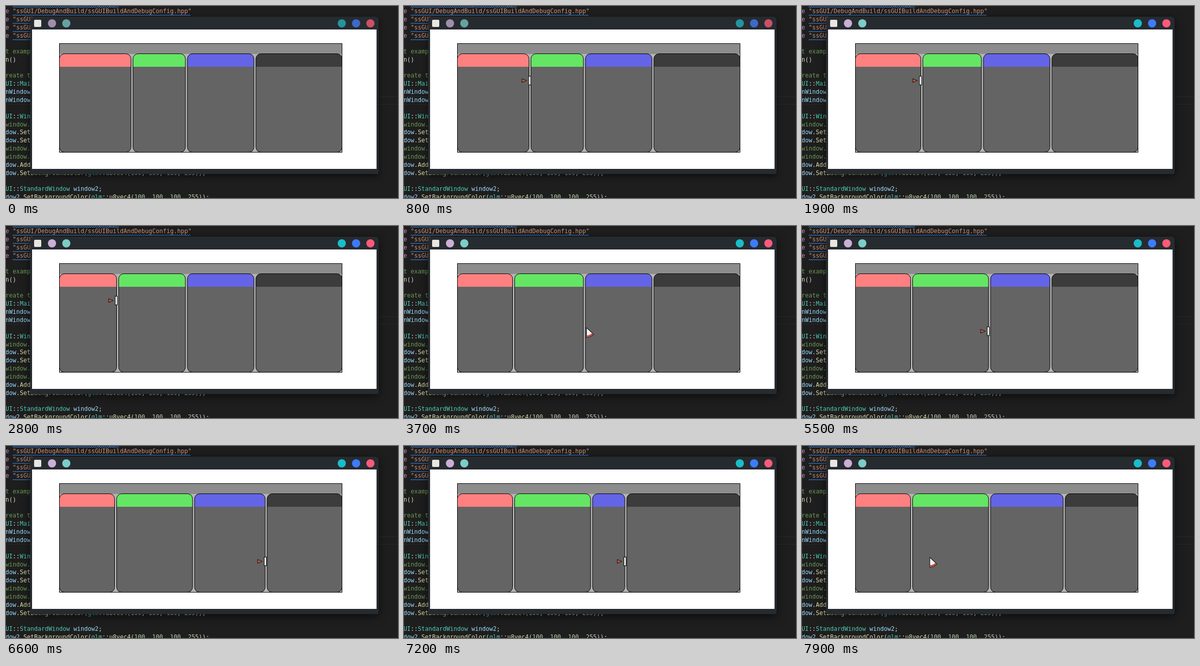
An HTML page with a canvas that plays this animation: 767 by 376 pixels, repeating every 8000 ms.

```html
<!DOCTYPE html>
<html lang="en">
<head>
<meta charset="utf-8">
<title>Resizable docked panels</title>
<style>
html, body { margin: 0; width: 100%; height: 100%; overflow: hidden; background: #1e1e1e; }
canvas { display: block; }
</style>
</head>
<body>
<canvas id="stage" width="767" height="376"></canvas>
<script>
const ctx = document.getElementById('stage').getContext('2d');
const LOOP = 8000, STEP = 100;
const COL = 6.998;

const colors = {
  k: '#c586c0', s: '#ce9178', c: '#6a9955', f: '#dcdcaa',
  t: '#4ec9b0', v: '#9cdcfe', n: '#b5cea8', p: '#d4d4d4'
};

// Each code line: middle y, then "kind:text" runs.
const setColor = ['p:.', 'f:SetBackgroundColor', 'p:(', 't:glm', 'p:::', 'f:u8vec4', 'p:(',
  'n:100', 'p:, ', 'n:100', 'p:, ', 'n:100', 'p:, ', 'n:255', 'p:));'];
const include = path => ['k:e ', 's:"ssGUI/' + path + '"'];
const code = [
  [-6, ...include('HeaderGroups/Group.hpp')],
  [10, ...include('DebugAndBuild/ssGUIBuildAndDebugConfig.hpp')],
  [26, ...include('')], [42, ...include('')], [58, ...include('')],
  [89, 'c:t example'],
  [105, 'f:n', 'p:()'],
  [136, 'c:reate the'],
  [152, 't:UI', 'p:::', 't:Main'],
  [168, 'v:nWindow'], [184, 'v:nWindow'],
  [216, 't:UI', 'p:::', 't:Wind'],
  [232, 'c:window.'],
  [247, 'v:dow', 'p:.', 'f:Set'], [263, 'v:dow', 'p:.', 'f:Set'],
  [279, 'c:window.'], [295, 'c:window.'],
  [311, 'v:dow', 'p:.', 'f:Add'],
  [327, 'v:dow', ...setColor],
  [358, 't:UI', 'p:::', 't:StandardWindow ', 'v:window2', 'p:;'],
  [374, 'v:dow2', ...setColor]
];

// Divider positions, one value per step while being dragged.
const dividers = [
  { from: 1900, rest: 246.5, y: 146, grip: -2.7, path: [234.5, 204, 186, 199, 224, 241, 241, 238, 228, 218.5, 214.5] },
  { from: 4600, rest: 353, y: 198, endY: 206, grip: -.7, path: [365, 387, 404, 386, 352, 326, 335, 352, 363, 367] },
  { from: 6600, rest: 487, y: 226, grip: -1.6, path: [509, 536, 549, 518, 456, 394, 434, 484, 519, 513] }
];

// Free pointer: time, x, y, and 1 for the resize shape.
const pointer = [
  [200, 0, 0], [300, 58, 28], [400, 122, 62], [500, 186, 100], [600, 234, 124], [700, 255, 135], [800, 246, 146, 1],
  [3100, 236, 157], [3200, 286, 178], [3300, 338, 192], [3400, 357, 197], [3700, 356, 198],
  [4200, 352.5, 198, 1], [4400, 350.5, 198, 1],
  [5600, 378, 208], [5700, 424, 214], [5800, 472, 220], [5900, 496, 223],
  [6100, 489, 223], [6200, 483.5, 225, 1],
  [7600, 468, 225], [7700, 372, 222], [7800, 286, 219], [7900, 249, 217]
];

function rect(x, y, w, h, fill) {
  ctx.fillStyle = fill;
  ctx.fillRect(x, y, w, h);
}

function rounded(x, y, w, h, r) {
  ctx.beginPath();
  ctx.roundRect(x, y, w, h, r);
}

function dot(x, fill) {
  ctx.fillStyle = fill;
  ctx.beginPath();
  ctx.arc(x, 34, 8, 0, 7);
  ctx.fill();
}

function squiggle(x, end, y) {
  ctx.strokeStyle = '#3794ff';
  ctx.lineWidth = 1;
  ctx.beginPath();
  for (let up = 0; x < end; x += 2, up ^= 1) ctx.lineTo(x, y + (up ? -1 : 1));
  ctx.stroke();
}

function drawEditor() {
  rect(0, 0, 767, 376, '#1e1e1e');
  rect(0, 177, 767, 1, '#292929');
  rect(0, 192, 767, 1, '#292929');
  ctx.font = '11.63px "DejaVu Sans Mono", monospace';
  for (const [y, ...runs] of code) {
    let x = -1;
    for (const run of runs) {
      const text = run.slice(2), end = x + text.length * COL;
      ctx.fillStyle = colors[run[0]];
      ctx.fillText(text, x, y + 4);
      if (run[0] === 's') squiggle(x, end, y + 8);
      x = end;
    }
  }
}

function drawWindow(focused) {
  ctx.save();
  ctx.shadowColor = 'rgba(0,0,0,.6)';
  ctx.shadowBlur = focused ? 18 : 12;
  ctx.shadowOffsetY = 4;
  ctx.fillStyle = '#262b30';
  rounded(47, 21, 682, 308, [6, 6, 3, 3]);
  ctx.fill();
  ctx.restore();
  rect(51, 46, 674, 273, '#fff');

  ctx.fillStyle = '#e9e6e0';
  rounded(55, 27, 14, 14, 2);
  ctx.fill();
  const tones = focused
    ? ['#cbafd6', '#7ccdc7', '#18bec9', '#3d7bff', '#ff5a7a']
    : ['#a08fab', '#64a39f', '#22959e', '#3f69c9', '#cd5064'];
  [90, 118, 657, 685, 713].forEach((x, i) => dot(x, tones[i]));
}

function drawPanel(left, right, color) {
  ctx.save();
  rounded(left, 93.5, right - left, 193, 10);
  ctx.clip();
  rect(left, 93, right - left, 194, '#646464');
  rect(left, 93, right - left, 26, color);
  ctx.restore();
  ctx.strokeStyle = '#000';
  ctx.lineWidth = 1;
  rounded(left, 93.5, right - left, 193, 10);
  ctx.stroke();
}

function drawPanels(splits) {
  rect(104, 73, 554, 214, '#b4b4b4');
  rect(104, 73, 554, 21, '#8c8c8c');
  ctx.strokeStyle = '#000';
  ctx.lineWidth = 1;
  ctx.strokeRect(104.5, 73.5, 553, 213);
  const edges = [102.5, ...splits, 659.5];
  ['#ff8080', '#64e664', '#6464e6', '#3c3c3c'].forEach((color, i) =>
    drawPanel(edges[i] + 2, edges[i + 1] - 2, color));
}

function shape(d, fill, line) {
  const path = new Path2D(d);
  ctx.fillStyle = fill;
  ctx.fill(path);
  if (!line) return;
  ctx.strokeStyle = line;
  ctx.lineWidth = 1.3;
  ctx.lineJoin = 'round';
  ctx.stroke(path);
}

function drawPointer([, x, y, resize]) {
  ctx.save();
  ctx.translate(x, y);
  if (resize) {
    shape('M-15 -3.7L-6 0L-15 3.7Z', '#d0553c', '#222');
    shape('M-2.2 -8.5H2.2V8.5H-2.2Z', '#f2f2f2', '#222');
  } else {
    shape('M1 1L15 14Q9 20 1 20.5Z', '#f4f2f2', '#222');
    shape('M1.6 16.5Q8 16 12 11.8L14.2 14Q9 19.4 1.6 19.8Z', '#d0483f');
  }
  ctx.restore();
}

function splitAt(d, t) {
  if (t < d.from) return d.rest;
  return d.path[Math.min((t - d.from) / STEP, d.path.length - 1)];
}

function pointerAt(t) {
  const free = pointer.findLast(p => p[0] <= t);
  const held = dividers.findLast(d => d.from <= t);
  if (!held || free[0] > held.from) return free;
  const end = held.from + (held.path.length - 1) * STEP;
  const part = Math.min(1, (t - held.from) / (end - held.from));
  const y = held.y + ((held.endY || held.y) - held.y) * part;
  // The second drag ends with the pointer slightly behind its divider.
  const lag = held.endY && t >= end ? -1.8 : 0;
  return [t, splitAt(held, t) + held.grip + lag, y, 1];
}

function draw(now) {
  const t = Math.floor(now % LOOP / STEP) * STEP;
  drawEditor();
  drawWindow(t >= 1300);
  drawPanels(dividers.map(d => splitAt(d, t)));
  const p = pointerAt(t);
  if (p) drawPointer(p);
  requestAnimationFrame(draw);
}
requestAnimationFrame(draw);
</script>
</body>
</html>
```
